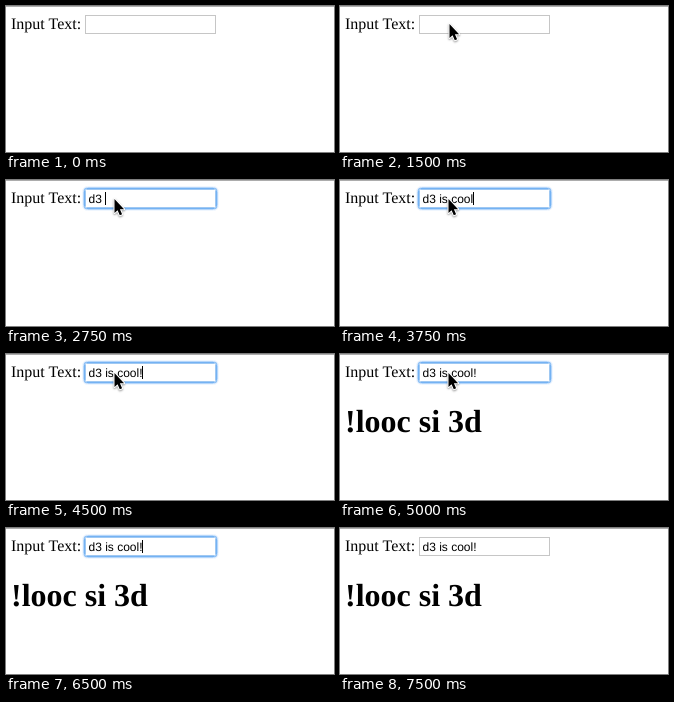
Animation, 328 px wide and 146 px high, one loop 7.75 s. Source, as an HTML page with a canvas:

```html
<!DOCTYPE html>
<html lang="en">
<head>
<meta charset="utf-8">
<title>Reversed input text</title>
<style>
  html, body { margin: 0; width: 100%; height: 100%; overflow: hidden; background: #fff; }
  canvas { display: block; }
</style>
</head>
<body>
<canvas id="stage" width="328" height="146"></canvas>
<script>
const ctx = document.getElementById('stage').getContext('2d');
const LOOP = 7750;
const SERIF = '"Liberation Serif", serif';
const SANS = '"Liberation Sans", sans-serif';
const FULL_TEXT = 'd3 is cool!';
const FOCUS = { from: 1750, to: 7000 };
const REVERSED_AT = 5000;

// [time, typed characters]
const typing = [[0, 0], [2250, 1], [2500, 2], [2750, 3], [3000, 6],
  [3250, 7], [3500, 9], [3750, 10], [4500, 11]];

// [time, caret visible]
const blinking = [[0, false], [1750, true], [4250, false], [4500, true],
  [5000, false], [5500, true], [6000, false], [6500, true], [7000, false]];

// [time, pointer tip]
const pointing = [[0, null], [750, [135, -6]], [1000, [115, 17]], [1500, [109.5, 18]],
  [1750, [108.5, 19]], [6000, [118, 24]], [6250, [127, 27]], [6500, null]];

const arrow = new Path2D('M0 0V14L3.1 11.2L5.3 16.3L7.6 15.3L5.4 10.2H9.6Z');

function valueAt(steps, t) {
  let value;
  for (const [time, next] of steps) if (time <= t) value = next;
  return value;
}

function write(text, x, y, font) {
  ctx.font = font;
  ctx.fillStyle = '#000';
  ctx.fillText(text, x, y);
}

function drawField(focused) {
  if (focused) {
    const rings = [[76.5, 6.5, 5, '#eff6fe'], [77.5, 7.5, 4, '#b5d6fa'],
      [78.5, 8.5, 2, '#74b2f3'], [79.5, 9.5, 1, '#9fc8f2']];
    for (const [x, y, radius, color] of rings) {
      ctx.strokeStyle = color;
      ctx.beginPath();
      ctx.roundRect(x, y, 289 - 2 * x, 37 - 2 * y, radius);
      ctx.stroke();
    }
  } else {
    ctx.strokeStyle = '#c6c6c6';
    ctx.strokeRect(79.5, 9.5, 130, 18);
  }
}

function drawPointer([x, y]) {
  ctx.save();
  ctx.translate(x, y);
  ctx.lineJoin = 'round';
  ctx.lineWidth = 2;
  ctx.strokeStyle = '#fff';
  ctx.shadowColor = 'rgba(0, 0, 0, .4)';
  ctx.shadowBlur = 2;
  ctx.shadowOffsetY = 1;
  ctx.stroke(arrow);
  ctx.shadowColor = 'transparent';
  ctx.fillStyle = '#000';
  ctx.fill(arrow);
  ctx.restore();
}

function draw(t) {
  ctx.fillStyle = '#fff';
  ctx.fillRect(0, 0, 328, 146);
  ctx.fillStyle = '#acacac';
  ctx.fillRect(0, 0, 328, 1);

  write('Input Text:', 5, 23, `16px ${SERIF}`);
  drawField(t >= FOCUS.from && t < FOCUS.to);

  const typed = FULL_TEXT.slice(0, valueAt(typing, t));
  write(typed, 82.5, 23, `12px ${SANS}`);
  if (valueAt(blinking, t)) {
    const caretX = Math.floor(82.6 + ctx.measureText(typed).width);
    ctx.fillRect(caretX, 12, 1, 13);
  }

  if (t >= REVERSED_AT) {
    write([...FULL_TEXT].reverse().join(''), 5, 78, `bold 32px ${SERIF}`);
  }

  const tip = valueAt(pointing, t);
  if (tip) drawPointer(tip);
}

ctx.textRendering = 'geometricPrecision';
const start = performance.now();
function tick() {
  draw((performance.now() - start) % LOOP);
  requestAnimationFrame(tick);
}
tick();
</script>
</body>
</html>
```
